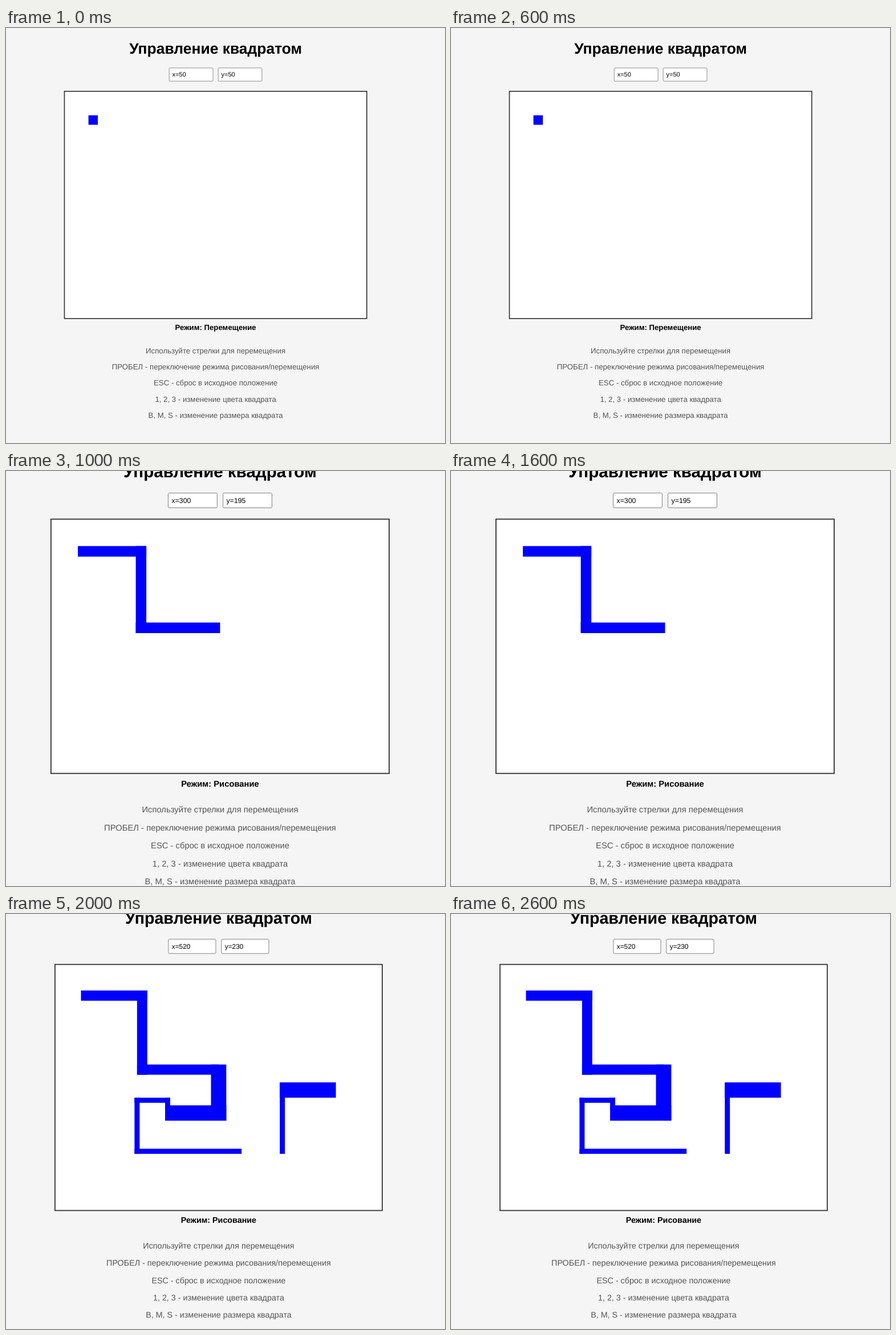
Write an HTML page that moves like this. It is 770 by 727 pixels and loops after 3000 ms.

```html
<!DOCTYPE html>
<html lang="ru">
<head>
<meta charset="utf-8">
<title>Управление квадратом</title>
<style>
  html, body { margin: 0; width: 100%; height: 100%; overflow: hidden; background: #f5f5f5; }
  svg { display: block; width: 770px; height: 727px; }
  text { font-family: "Liberation Sans", Arial, sans-serif; font-size: 16px; text-rendering: geometricPrecision; }
  .mid { text-anchor: middle; }
  .title { font-size: 32px; font-weight: bold; }
  .mode { font-weight: bold; }
  .hint { fill: #555; }
  .value { font-size: 13.333px; }
  .field { fill: #fff; stroke: #767676; }
  .board { fill: #fff; stroke: #333; stroke-width: 2px; }
  .trail { fill: #00f; }
  .scene { visibility: hidden; animation: show 3s step-end infinite; }
  @keyframes show {
    0% { visibility: visible; }
    33.3333%, 100% { visibility: hidden; }
  }
</style>
</head>
<body>
<svg id="stage" viewBox="0 0 770 727"></svg>
<script>
  const hints = [
    'Используйте стрелки для перемещения',
    'ПРОБЕЛ - переключение режима рисования/перемещения',
    'ESC - сброс в исходное положение',
    '1, 2, 3 - изменение цвета квадрата',
    'B, M, S - изменение размера квадрата'
  ];

  // Each stroke drags a square: [size, x, y, x, y, ...]
  const start = [[20, 50, 50, 160, 50, 160, 195, 300, 195]];
  const full = [
    ...start,
    [30, 305, 195, 305, 275, 215, 275],
    [10, 215, 275, 215, 260, 155, 260, 155, 360, 355, 360],
    [10, 440, 360, 440, 230],
    [30, 440, 230, 520, 230]
  ];

  const scenes = [
    { left: 103.3, top: 111.7, scale: 0.826, x: 50, y: 50, mode: 'Перемещение', strokes: [[20, 50, 50, 50, 50]] },
    { left: 79.8, top: 85.3, scale: 0.924, x: 300, y: 195, mode: 'Рисование', strokes: start },
    { left: 86.8, top: 89.3, scale: 0.8942, x: 520, y: 230, mode: 'Рисование', strokes: full }
  ];

  const rect = (cls, x, y, w, h, r = 0) =>
    `<rect class="${cls}" x="${x}" y="${y}" width="${w}" height="${h}" rx="${r}"/>`;
  const text = (cls, x, y, str) => `<text class="${cls}" x="${x}" y="${y}">${str}</text>`;
  const field = (x, str) => rect('field', x + 0.5, -50.5, 93, 28, 2) + text('value', x + 7, -31.8, str);

  function trail([size, ...p]) {
    let out = '';
    for (let i = 0; i + 3 < p.length; i += 2) {
      const [x1, y1, x2, y2] = p.slice(i, i + 4);
      out += rect('trail', Math.min(x1, x2), Math.min(y1, y2),
        Math.abs(x2 - x1) + size, Math.abs(y2 - y1) + size);
    }
    return out;
  }

  const draw = (s, i) =>
    `<g class="scene" style="animation-delay:${i - 3}s"
      transform="translate(${s.left} ${s.top}) scale(${s.scale})">` +
    text('mid title', 320, -80.8, 'Управление квадратом') +
    field(221, 'x=' + s.x) + field(325, 'y=' + s.y) +
    rect('board', -1, -1, 642, 482) +
    s.strokes.map(trail).join('') +
    text('mid mode', 320, 505.7, 'Режим: ' + s.mode) +
    hints.map((h, n) => text('mid hint', 320, 555.2 + 34 * n, h)).join('') +
    '</g>';

  document.getElementById('stage').innerHTML = scenes.map(draw).join('');
</script>
</body>
</html>
```
